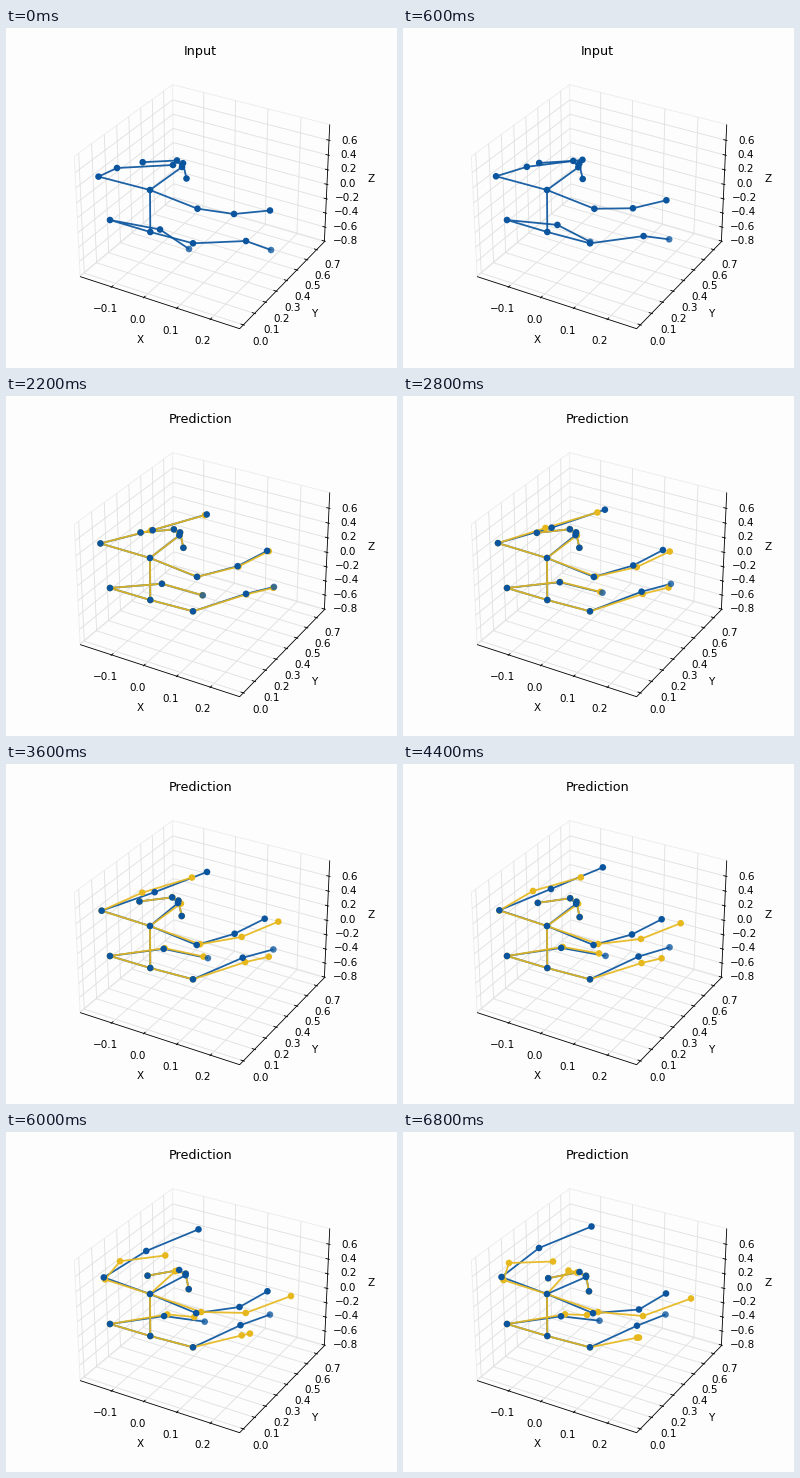
Recreate the animation shown at these times as a matplotlib script. Size 391 by 340 pixels, loop 7000 ms.

```python
import numpy as np
import matplotlib.pyplot as plt
from matplotlib.animation import FuncAnimation
from matplotlib.collections import LineCollection
from matplotlib.colors import to_rgba

W, H, DPI = 391, 340, 100
PT = 72 / DPI
FRAMES, SWITCH = 35, 10
LAST = FRAMES - 1
BLUE, GOLD, GRID, EDGE = "#0b559f", "#e6b81e", "#e0e0e0", "#ececec"

plt.rcParams["font.family"] = "DejaVu Sans"
fig = plt.figure(figsize=(W / DPI, H / DPI), dpi=DPI, facecolor="#fdfdfd")
ax = fig.add_axes([0, 0, 1, 1])
ax.set(xlim=(0, W), ylim=(H, 0))
ax.axis("off")


# ---- 3D box: perspective camera at elevation 30, azimuth -60 ----
HALF = np.array([0.5952, 0.5952, 0.4464])
ELEV, AZIM = np.radians(30), np.radians(-60)
TOWARD = np.array([np.cos(ELEV) * np.cos(AZIM), np.cos(ELEV) * np.sin(AZIM), np.sin(ELEV)])
RIGHT = np.array([-np.sin(AZIM), np.cos(AZIM), 0])
UP = np.cross(TOWARD, RIGHT)


def project(x, y, z):
    """Box coordinates in 0..1 to stage pixels."""
    p = (2 * np.array([x, y, z]) - 1) * HALF
    depth = 10 - p @ TOWARD
    return 198.5 + 1535 * (p @ RIGHT) / depth, 172.8 - 1535 * (p @ UP) / depth


def stroke(points, color, z):
    xs, ys = zip(*(project(*p) for p in points))
    ax.plot(xs, ys, color=color, lw=0.85 * PT, zorder=z, solid_capstyle="butt")


def label(x, y, text, size=7.5, va="center"):
    return ax.text(x, y, text, size=size, ha="center", va=va, color="black", zorder=3)


def ticks(first, count, step, low, high):
    """Yield index, position along the box side and text of each tick."""
    for k in range(count):
        value = first + k * step
        text = f"{value:.1f}" if value > -1e-9 else f"\u2212{-value:.1f}"
        yield k, (value - low) / (high - low), text.replace("\u22120.0", "0.0")


OUT, IN = 1 / 120, 1 / 60

stroke([(0, 0, 0), (0, 0, 1), (0, 1, 1), (1, 1, 1)], EDGE, 0.5)
stroke([(0, 0, 0), (0, 1, 0), (1, 1, 0)], EDGE, 0.5)
stroke([(0, 1, 0), (0, 1, 1)], EDGE, 0.5)

for k, f, text in ticks(-0.1, 4, 0.1, -0.2, 0.285):
    stroke([(f, 0, 0), (f, 1, 0), (f, 1, 1)], GRID, 1)
    stroke([(f, -OUT, 0), (f, IN, 0)], "black", 2)
    label(99 + 32.6 * k, 281.5 + 10.5 * k, text)

for k, f, text in ticks(0, 8, 0.1, -0.033, 0.78):
    stroke([(1, f, 0), (0, f, 0), (0, f, 1)], GRID, 1)
    stroke([(1 + OUT, f, 0), (1 - IN, f, 0)], "black", 2)
    label(254.5 + 10.8 * k - 0.07 * k * k, 314 - 11.8 * k + 0.12 * k * k, text)

for k, f, text in ticks(-0.8, 8, 0.2, -0.81, 0.81):
    stroke([(0, 0, f), (0, 1, f), (1, 1, f)], GRID, 1)
    stroke([(1 + OUT, 1, f), (1 - IN, 1, f)], "black", 2)
    label(339.3 + 0.6 * k, 213 - 14.3 * k, text)

stroke([(0, 0, 0), (1, 0, 0), (1, 1, 0), (1, 1, 1)], "black", 2)
label(134, 312, "X")
label(308, 286, "Y")
label(365, 151, "Z")
title = label(194.5, 27, "Input", 9.2, "baseline")


# ---- Skeleton motion: smooth paths through a few key points ----
def smooth(t, keys, points):
    """Cubic Hermite path through the points at the key times."""
    p = np.array(points, float)
    slopes = np.gradient(p, keys, axis=0)
    i = int(np.clip(np.searchsorted(keys, t, side="right") - 1, 0, len(keys) - 2))
    h = keys[i + 1] - keys[i]
    s = (t - keys[i]) / h
    return ((1 + 2 * s) * (1 - s) ** 2 * p[i] + s * (1 - s) ** 2 * h * slopes[i]
            + s * s * (3 - 2 * s) * p[i + 1] + s * s * (s - 1) * h * slopes[i + 1])


# Fixed joints have one point, slow ones a start and an end,
# swinging ones a point at each of these times.
SWING = np.array([0, 7, 20, LAST])
DRIFT = np.array([SWITCH, (SWITCH + LAST) / 2, LAST])

PATHS = {
    "pelvis": [(144.3, 204)],
    "hip_l": [(104, 192)],
    "hip_r": [(187, 215.3)],
    "neck": [(144, 162)],
    "nose": [(176, 139), (174.5, 139.5), (172.3, 139.3), (183, 145)],
    "shoulder_l": [(92.5, 148.6), (98.5, 145)],
    "elbow_l": [(111, 140), (139, 137), (148.5, 126.5), (136, 116)],
    "wrist_l": [(167, 137), (194, 125), (200.5, 105.5), (188.5, 94.5)],
    "shoulder_r": [(191.5, 180.7), (190, 181.2)],
    "elbow_r": [(228, 186), (232, 173.5), (228.5, 170), (236, 177.5)],
    "wrist_r": [(264, 182.5), (262.5, 160.3), (258.5, 155), (263, 161.5)],
    "knee_l": [(154, 201.5), (155, 191.3), (158, 184.3), (158, 184.3)],
    "foot_l": [(183, 221), (192.5, 205), (202.5, 193), (196.5, 188.7)],
    "knee_r": [(240, 213), (241, 202), (236, 193), (234, 193.7)],
    "foot_r": [(265, 222), (267.5, 198.5), (267, 184.3), (262.5, 182.5)],
}

# Face joints ride on the nose and tilt slowly.
FACE = {
    "eye_r": [(1, -3.8), (0, -1.2)],
    "eye_l": [(-5, -6.5), (-6.5, -5)],
    "ear_l": [(-39.3, -4.8), (-37.8, 1.2)],
    "ear_r": [(4.5, 11.5), (3, 14.3)],
}

# How far the prediction has strayed halfway through and at the end.
ERRORS = {
    "nose": [(2, 0), (-17.5, -6.5)],
    "eye_l": [(0, 0), (-2.5, 0.5)],
    "shoulder_l": [(0, 0.3), (2, 3)],
    "elbow_l": [(-18, 2), (-30, 15)],
    "wrist_l": [(-22, 10), (-38.5, 35)],
    "shoulder_r": [(4.5, -1), (5, -1.2)],
    "elbow_r": [(9, 4.5), (4, 6.5)],
    "wrist_r": [(19, 4), (25, 5)],
    "knee_l": [(1.5, -1), (4, -2)],
    "foot_l": [(-6.5, -2.5), (-12.5, -5.7)],
    "knee_r": [(3, 6.5), (0, 12)],
    "foot_r": [(-8, 11), (-26.5, 23)],
}

NAMES = [*PATHS, *FACE]
CHAINS = [
    "pelvis neck nose eye_l ear_l", "nose eye_r ear_r",
    "neck shoulder_l elbow_l wrist_l", "neck shoulder_r elbow_r wrist_r",
    "pelvis hip_l knee_l foot_l", "pelvis hip_r knee_r foot_r",
]


def follow(points, t):
    if len(points) == 1:
        return np.array(points[0])
    return smooth(t, SWING if len(points) == 4 else (0, LAST), points)


def real_pose(t):
    pose = {n: follow(p, t) for n, p in PATHS.items()}
    for n, p in FACE.items():
        pose[n] = pose["nose"] + follow(p, t)
    return pose


def pred_pose(t):
    pose = real_pose(t)
    for n, error in ERRORS.items():
        pose[n] = pose[n] + smooth(t, DRIFT, [(0, 0), *error])
    return pose


def body(color, line_z, dot_z, foot_alpha):
    lines = LineCollection([], colors=color, linewidths=1.8 * PT, alpha=0.92, zorder=line_z)
    ax.add_collection(lines, autolim=False)
    shades = [to_rgba(color, foot_alpha if n.startswith("foot") else 1) for n in NAMES]
    dots = ax.scatter([0] * len(NAMES), [0] * len(NAMES), s=(6.6 * PT) ** 2,
                      c=shades, linewidths=0, zorder=dot_z)
    return lines, dots


real_body = body(BLUE, 5, 8, 0.78)
pred_body = body(GOLD, 6, 7, 1)


def show(parts, pose):
    lines, dots = parts
    lines.set_segments([[pose[n] for n in chain.split()] for chain in CHAINS])
    dots.set_offsets([pose[n] for n in NAMES])


def draw(i):
    predicting = i >= SWITCH
    show(real_body, real_pose(i))
    show(pred_body, pred_pose(max(i, SWITCH)))
    for part in pred_body:
        part.set_visible(predicting)
    title.set_text("Prediction" if predicting else "Input")
    return [*real_body, *pred_body, title]


anim = FuncAnimation(fig, draw, frames=FRAMES, init_func=lambda: draw(0),
                     interval=200, repeat=True, repeat_delay=0)
plt.show()
```
